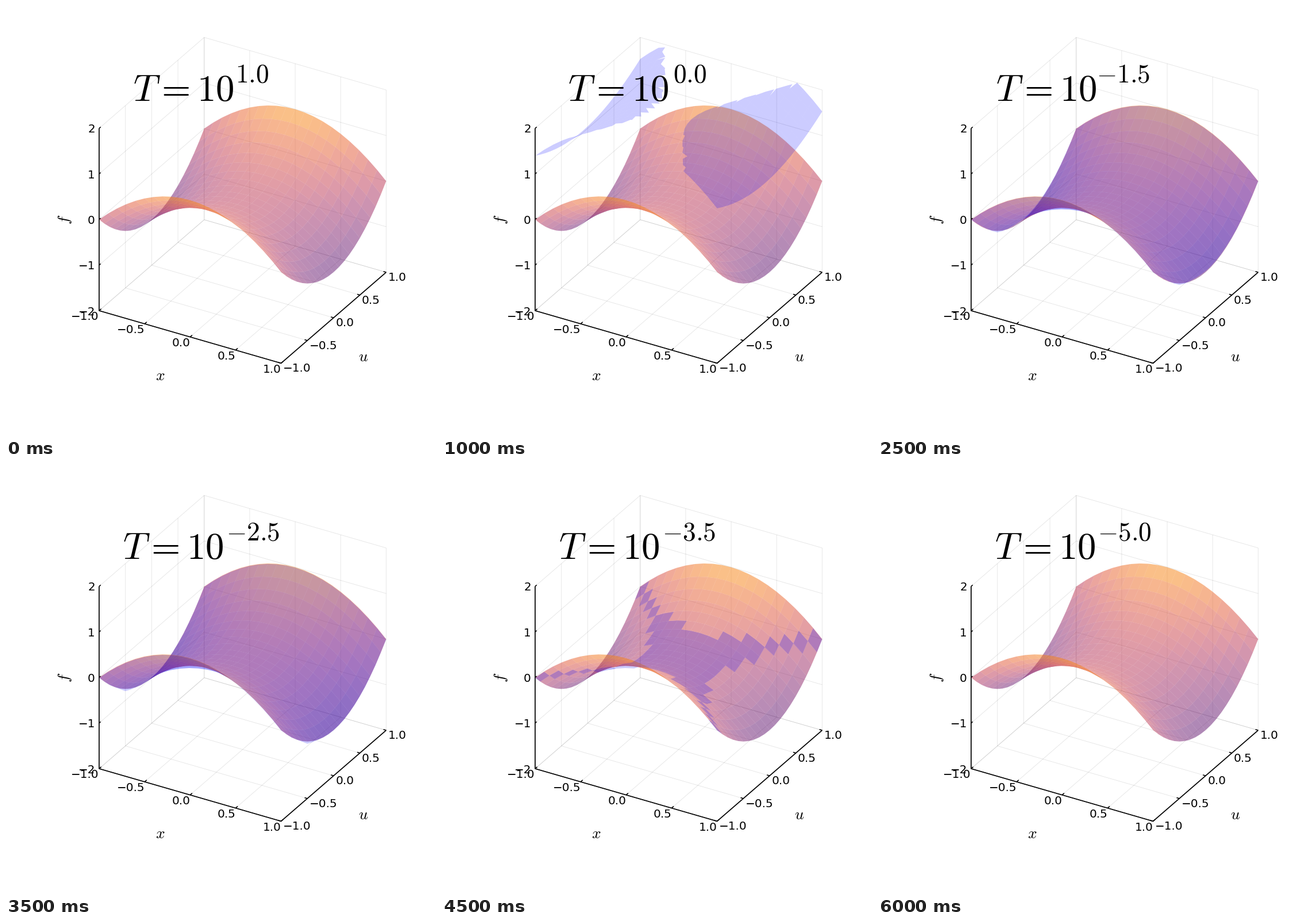
A matplotlib script for the animation above (6500 ms loop, 748x748 px).

```python
import numpy as np
import matplotlib.pyplot as plt
from matplotlib.animation import FuncAnimation
from matplotlib.collections import LineCollection, PolyCollection

SIZE, DPI = 748, 100
PT = 72 / DPI  # points per pixel
Z_MIN, Z_MAX = -2, 2
EXPONENTS = np.arange(1, -5.1, -0.5)
TANGENTS = np.array([-.9, -.72, -.25, -.15, -.05, .12, .3, .45, .7, .9])
TICKS = (-1, -.5, 0, .5, 1)

plt.rcParams["font.family"] = "DejaVu Sans"
plt.rcParams["mathtext.fontset"] = "cm"

fig = plt.figure(figsize=(SIZE / DPI, SIZE / DPI), dpi=DPI, facecolor="white")
ax = fig.add_axes([0, 0, 1, 1])
ax.set_xlim(0, SIZE)
ax.set_ylim(SIZE, 0)
ax.axis("off")


def project(points):
    """Orthographic projection of (x, u, f) to pixels."""
    x, u, f = np.asarray(points, float).T
    px = 162 + 158.25 * (x + 1) + 91.4 * (u + 1)
    py = 530 + 45.7 * (x + 1) - 79.1 * (u + 1) - 79.3 * (f - Z_MIN)
    return np.column_stack([px, py])


def add_lines(paths, width, alpha, zorder):
    ax.add_collection(LineCollection(
        [project(p) for p in paths], colors=[(0, 0, 0, alpha)],
        linewidths=width * PT, zorder=zorder, capstyle="butt"))


def label(x, y, text, size, **kw):
    return ax.text(x, y, text, fontsize=size * PT, va="baseline", zorder=6, **kw)


def draw_axes():
    grid = []
    for t in TICKS:
        grid.append([(t, -1, Z_MIN), (t, 1, Z_MIN), (t, 1, Z_MAX)])
        grid.append([(-1, t, Z_MAX), (-1, t, Z_MIN), (1, t, Z_MIN)])
    for z in range(Z_MIN, Z_MAX + 1):
        grid.append([(-1, -1, z), (-1, 1, z), (1, 1, z)])
    add_lines(grid, 0.9, 0.1, 1)

    axes = [[(-1, -1, Z_MAX), (-1, -1, Z_MIN), (1, -1, Z_MIN), (1, 1, Z_MIN)]]
    add_lines(axes, 1.7, 1, 2)

    marks = []
    for t in TICKS:
        name = f"{t:.1f}".replace("-", "\u2212")
        marks.append([(t, -1, Z_MIN), (t, -.96, Z_MIN)])
        marks.append([(1, t, Z_MIN), (.97, t, Z_MIN)])
        px, py = project([(t, -1, Z_MIN)])[0]
        label(px, py + 16.3, name, 20, ha="right")
        px, py = project([(1, t, Z_MIN)])[0]
        label(px + 3.5, py + 15, name, 20, ha="left")
    for z in range(Z_MIN, Z_MAX + 1):
        marks.append([(-1, -1, z), (-1, -.97, z)])
        py = project([(-1, -1, z)])[0, 1]
        label(155, py + 7.6, str(z).replace("-", "\u2212"), 20, ha="right")
    add_lines(marks, 1.6, 1, 2)

    label(268, 651, "$x$", 27.5, ha="center")
    label(621, 618, "$u$", 27.5, ha="center")
    label(109.7, 371, "$f$", 27.5, ha="center", rotation=90,
          rotation_mode="anchor")


def saddle(x, u):
    return u ** 2 - x ** 2


def soft_saddle(x, u, temp):
    """Log-sum-exp over tangents in u; NaN where exp leaves double range."""
    scaled = saddle(x, u) / temp
    powers = -(u[..., None] - TANGENTS) ** 2 / temp
    top = powers.max(axis=-1)
    total = np.exp(powers - top[..., None]).sum(axis=-1)
    value = saddle(x, u) + temp * (top + np.log(total))
    return np.where((scaled > -745.1) & (scaled < 709.7), value, np.nan)


def cells(z):
    """Corner lists of the mesh cells, from back to front."""
    n = len(z) - 1
    for j in reversed(range(n)):
        for i in range(n):
            corners = [(j, i), (j, i + 1), (j + 1, i + 1), (j + 1, i)]
            yield np.array([(X[c], U[c], z[c]) for c in corners])


def clip_top(quad):
    """Cut at Z_MAX keeping only the end of each edge, which leaves notches."""
    inside = quad[:, 2] <= Z_MAX
    if inside.all():
        return quad
    out = [quad[0]] if inside[0] else []
    for k in range(3):
        a, b = quad[k], quad[k + 1]
        if inside[k] != inside[k + 1]:
            cut = a + (b - a) * (Z_MAX - a[2]) / (b[2] - a[2])
            if inside[k] or k == 0:
                out.append(cut)
        if inside[k + 1]:
            out.append(b)
    return np.array(out)


def soft_polygons(temp):
    polys = []
    for quad in cells(soft_saddle(X, U, temp)):
        if np.isfinite(quad).all():
            quad = clip_top(quad)
            if len(quad) > 2:
                polys.append(project(quad))
    return polys


grid_1d = np.linspace(-1, 1, 21)
X, U = np.meshgrid(grid_1d, grid_1d)

draw_axes()

base = list(cells(saddle(X, U)))
heights = np.array([q[:, 2].mean() for q in base])
colors = plt.get_cmap("inferno")((heights - Z_MIN) / (Z_MAX - Z_MIN))
colors[:, 3] = 0.5
ax.add_collection(PolyCollection([project(q) for q in base], facecolors=colors,
                                 edgecolors="none", linewidths=0, zorder=3))

soft = PolyCollection([], facecolors=[(0, 0, 1, 0.2)], edgecolors="none",
                      linewidths=0, zorder=4)
ax.add_collection(soft)

title = label(0, 164.6, "$T = 10$", 65, ha="left")
power = label(0, 132.3, "", 45.5, ha="right")


def update(k):
    text = f"{EXPONENTS[k]:.1f}"
    width = 238 + 32 * text.startswith("-") - 5 * ("1." in text)
    title.set_x(339 - width / 2 - 1.4)
    power.set_x(339 + width / 2 + 2)
    power.set_text(f"${text}$")
    soft.set_verts(soft_polygons(10 ** EXPONENTS[k]))
    return soft, title, power


anim = FuncAnimation(fig, update, frames=len(EXPONENTS), interval=500,
                     repeat=True, repeat_delay=0, blit=False)
plt.show()
```
